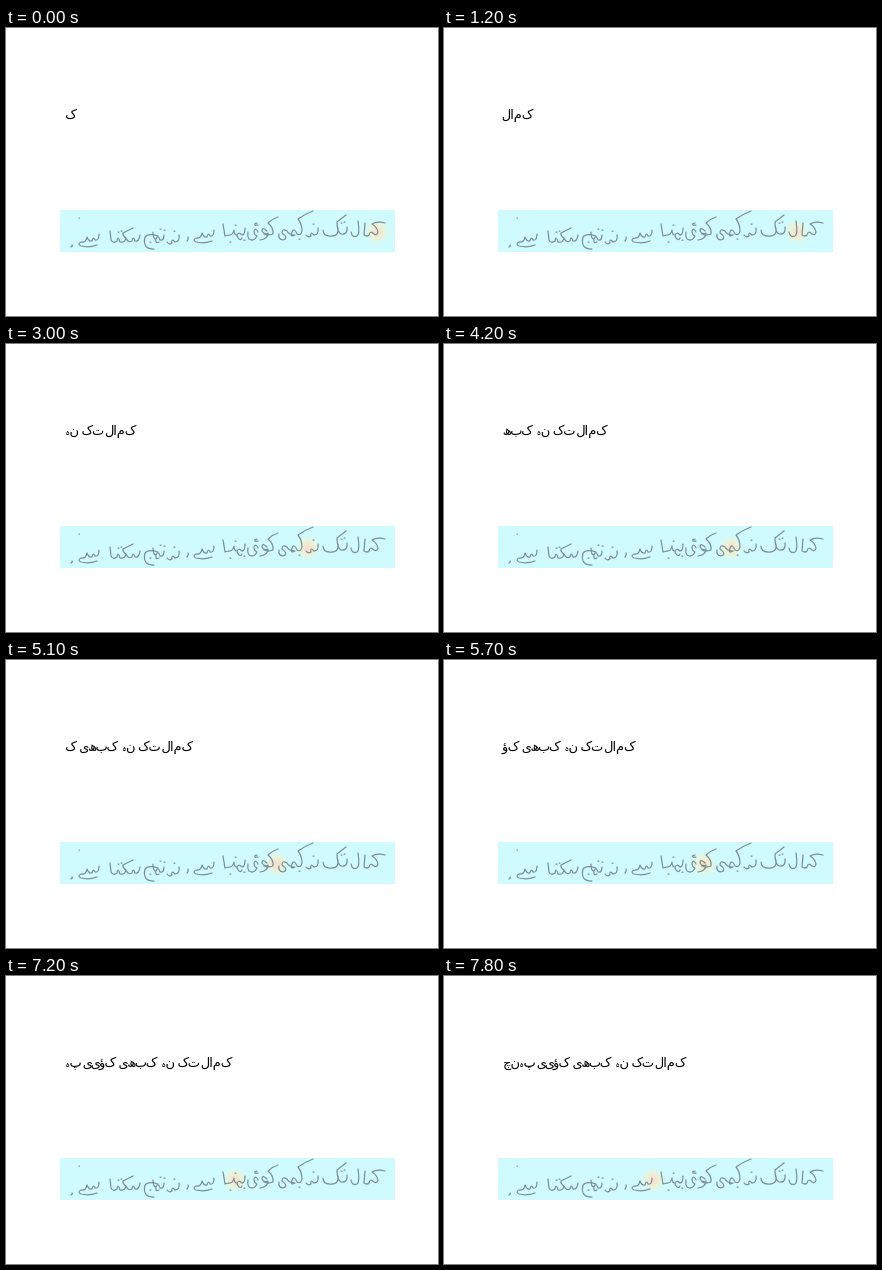
Write an HTML page with a canvas that moves like this. It is 432 by 288 pixels and loops after 8000 ms.

```html
<!DOCTYPE html>
<html lang="ur">
<head>
<meta charset="utf-8">
<style>
html, body { margin: 0; width: 100%; height: 100%; overflow: hidden; background: #fff; }
canvas { display: block; }
</style>
</head>
<body>
<canvas id="stage" width="432" height="288"></canvas>
<script>
const ctx = document.getElementById('stage').getContext('2d');
const LOOP = 8000, FIRST = 600, STEP = 300, LEFT = 59, BASE = 91;

// The hamza is typed after its waw, as a separate step.
const letters = [...'کمال تک نہ کبھی کؤیی پہنچ'.normalize('NFD')];
const HAMZA = '\u0654';
const advance = {
  'ک': 12, 'م': 7.5, 'ا': 4, 'ل': 7, ' ': 3.3, 'ت': 9.5, 'ن': 7.5, 'ہ': 5.5,
  'ب': 9.5, 'ھ': 8.5, 'ی': 8, 'و': 4.5, 'پ': 10, 'چ': 8.5, [HAMZA]: 0
};

// Typed count and pen position along the handwritten line.
const stops = [[1, 371], [4, 353], [10, 302], [14, 287], [19, 260], [22, 249], [26, 209]];

const pen = new Path2D();
function write(d, x = 0, y = 0) {
  pen.addPath(new Path2D(d), new DOMMatrix([1, 0, 0, 1, x, y]));
}

const nah = 'M12 4Q13 11 8 11Q4 7 5 12Q2 14 0 11M7 0h1';
const hay = 'M22 2Q22 9 18 8Q16 4 15 9Q12 10 10 5Q9 11 4 10Q0 12 4 14Q12 16 20 13';

write('M379 195Q371 193 366 196Q371 199 372 204Q371 208 368 206Q364 202 363 207Q361 209 358 207L359 195');
write('M352 193Q354 206 351 208Q346 210 345 204');
write('M341 199Q342 207 335 206Q331 204 331 194L340 187M332 200Q333 209 324 208Q317 208 317 202M335 195h1M338 194h1');
write(nah, 300, 196);
write('M307 183Q299 186 292 191Q296 196 296 203Q295 208 291 206Q288 199 286 204Q284 210 289 207Q283 207 281 203');
write('M281 203Q276 200 276 205Q283 210 277 212Q272 211 273 206M293 211h1');
write('M272 189Q266 191 262 195Q268 200 267 206Q262 208 258 206M261 203Q256 198 256 203Q258 207 262 205Q262 211 254 212');
write('M252 204Q250 199 248 203Q248 207 251 208Q248 214 243 211Q241 208 242 204M251 195q-3 0-2 2l3 0');
write('M239 200Q239 207 236 207Q232 203 231 208Q234 214 236 210M231 207Q228 207 228 202Q227 207 223 207L219 208L217 196');
write('M238 212h1M229 197h1M224 214h1');
write(hay, 186, 200);
write('M182 209q1 2-1 4');
write(nah, 161, 203);
write('M158 207Q158 213 154 212Q152 206 150 211Q149 216 153 214M150 211Q147 211 147 204');
write('M152 208Q142 205 139 209Q136 221 148 221M154 201h1M158 202h1M144 214h1');
write('M134 207Q133 214 129 213Q127 207 126 213Q122 215 120 210Q116 207 117 205L127 200');
write('M120 210Q119 215 114 214Q112 207 111 213Q107 216 105 212L104 203M112 204h1M115 203h1');
write(hay, 71, 204);
write('M66 217q1 1-1 2M73 190h.5');

function penX(n) {
  let i = 1;
  while (i < stops.length - 1 && stops[i][0] < n) i++;
  const [n0, x0] = stops[i - 1], [n1, x1] = stops[i];
  return x0 + (x1 - x0) * (n - n0) / (n1 - n0);
}

function drawSpot(n) {
  const x = penX(n), y = 204, r = 13;
  const glow = ctx.createRadialGradient(x, y, 0, x, y, r);
  glow.addColorStop(0, 'rgba(255,214,196,.85)');
  glow.addColorStop(.5, 'rgba(250,236,198,.7)');
  glow.addColorStop(1, 'rgba(235,250,210,0)');
  ctx.fillStyle = glow;
  ctx.fillRect(x - r, y - r, 2 * r, 2 * r);
}

function drawLetters(n) {
  ctx.fillStyle = '#000';
  ctx.font = '13px "DejaVu Sans", sans-serif';
  ctx.textAlign = 'center';
  let x = LEFT;
  for (let i = n - 1; i >= 0; i--) {
    const ch = letters[i];
    if (ch === HAMZA) continue;
    const mark = i + 1 < n && letters[i + 1] === HAMZA ? HAMZA : '';
    ctx.fillText((ch + mark).normalize('NFC'), x + advance[ch] / 2, BASE);
    x += advance[ch];
  }
}

function draw(t) {
  const n = t < FIRST ? 1 : Math.min(letters.length, 2 + Math.floor((t - FIRST) / STEP));
  ctx.fillStyle = '#fff';
  ctx.fillRect(0, 0, 432, 288);
  ctx.fillStyle = '#cffbff';
  ctx.fillRect(54, 182, 335, 42);
  drawSpot(n);
  ctx.strokeStyle = '#7c8f96';
  ctx.lineWidth = 1.25;
  ctx.lineCap = ctx.lineJoin = 'round';
  ctx.stroke(pen);
  drawLetters(n);
}

const start = performance.now();
function tick() {
  draw((performance.now() - start) % LOOP);
  requestAnimationFrame(tick);
}
draw(0);
requestAnimationFrame(tick);
</script>
</body>
</html>
```
